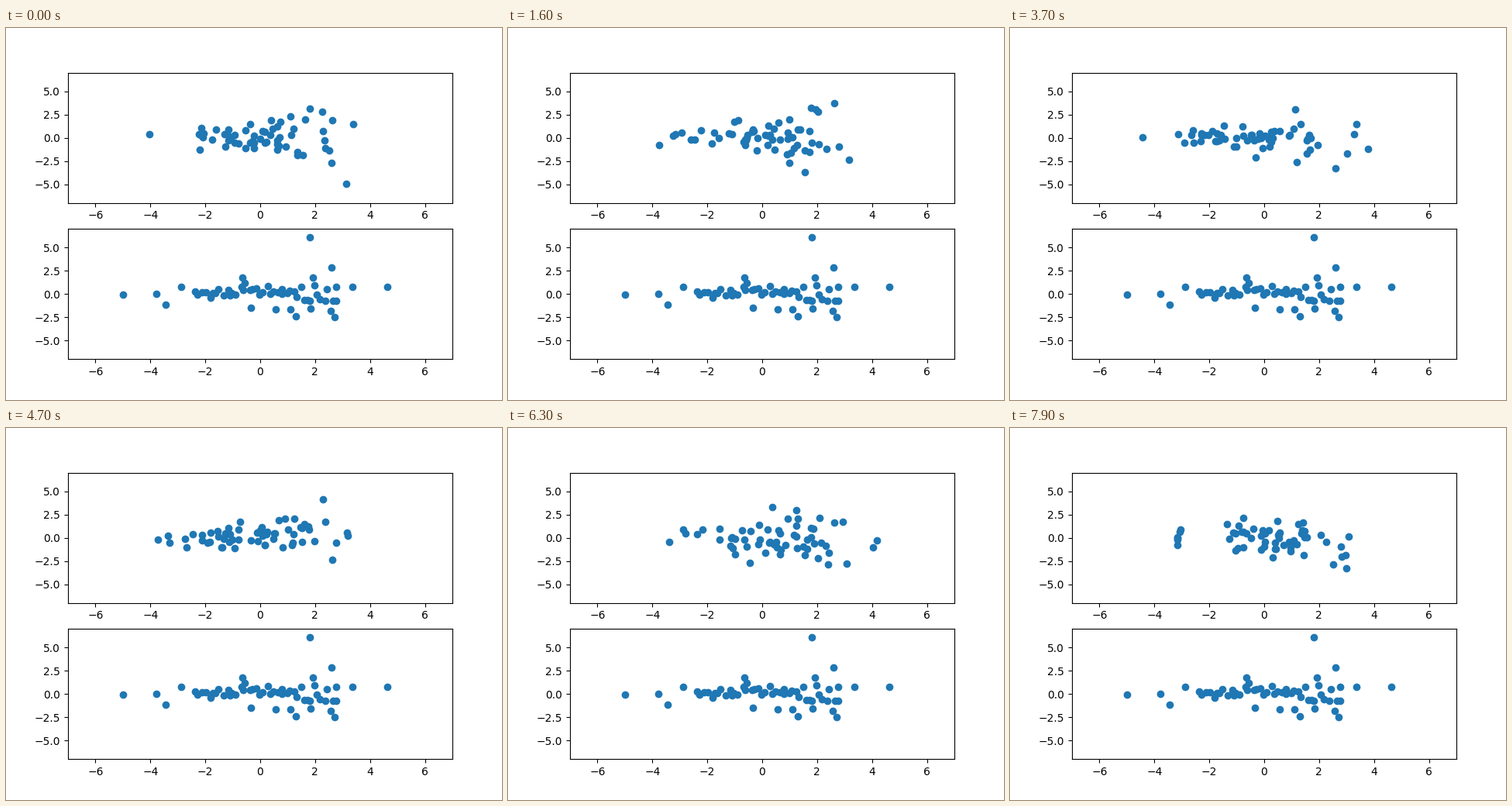
Animation of 640x480 px, one loop 8000 ms. Source, as a matplotlib script:

```python
import numpy as np
import matplotlib.pyplot as plt
from matplotlib.animation import FuncAnimation

FRAMES, INTERVAL = 80, 100
COUNT = 60
LIMIT = 7

# Outliers that give the still cloud its outline
KEYS = np.array([
    (-5.0, -0.05), (-3.77, 0.02), (-3.43, -1.13), (-2.88, 0.78),
    (-0.64, 1.78), (-0.33, -1.47), (0.57, -1.65), (1.1, -1.65),
    (1.3, -2.38), (1.81, 6.1), (1.84, -1.55), (1.92, 1.78),
    (2.57, -1.82), (2.6, 2.85), (2.71, -2.45), (3.36, 0.77), (4.62, 0.77),
])


def funnel(seed):
    """Independent funnel sample: the spread in y grows with x."""
    rng = np.random.default_rng(seed)
    x = rng.normal(0, np.sqrt(3), COUNT)
    y = rng.normal(0, 1, COUNT) * np.exp(x / 4)
    return np.column_stack([x, y])


def still_cloud():
    """Outliers around a seeded, evenly jittered core."""
    rng = np.random.default_rng(5)
    n = COUNT - len(KEYS)
    x = np.linspace(-2.35, 2.85, n) + rng.normal(0, 0.04, n)
    y = 0.2 + 0.45 * rng.normal(0, 1, n) * np.exp(x / 4)
    return np.vstack([KEYS, np.column_stack([x, np.clip(y, -0.75, 1.35)])])


fig, (top, bottom) = plt.subplots(2, 1, figsize=(6.4, 4.8), dpi=100)
for ax in (top, bottom):
    ax.set_xlim(-LIMIT, LIMIT)
    ax.set_ylim(-LIMIT, LIMIT)
    ax.set_xticks(range(-6, 7, 2))
    ax.set_yticks(np.arange(-5, 5.1, 2.5))

dots = top.scatter(*funnel(0).T, color="C0")
bottom.scatter(*still_cloud().T, color="C0")


def update(i):
    dots.set_offsets(funnel(i))
    return (dots,)


anim = FuncAnimation(fig, update, frames=FRAMES, interval=INTERVAL,
                     repeat=True, repeat_delay=0)
plt.show()
```
